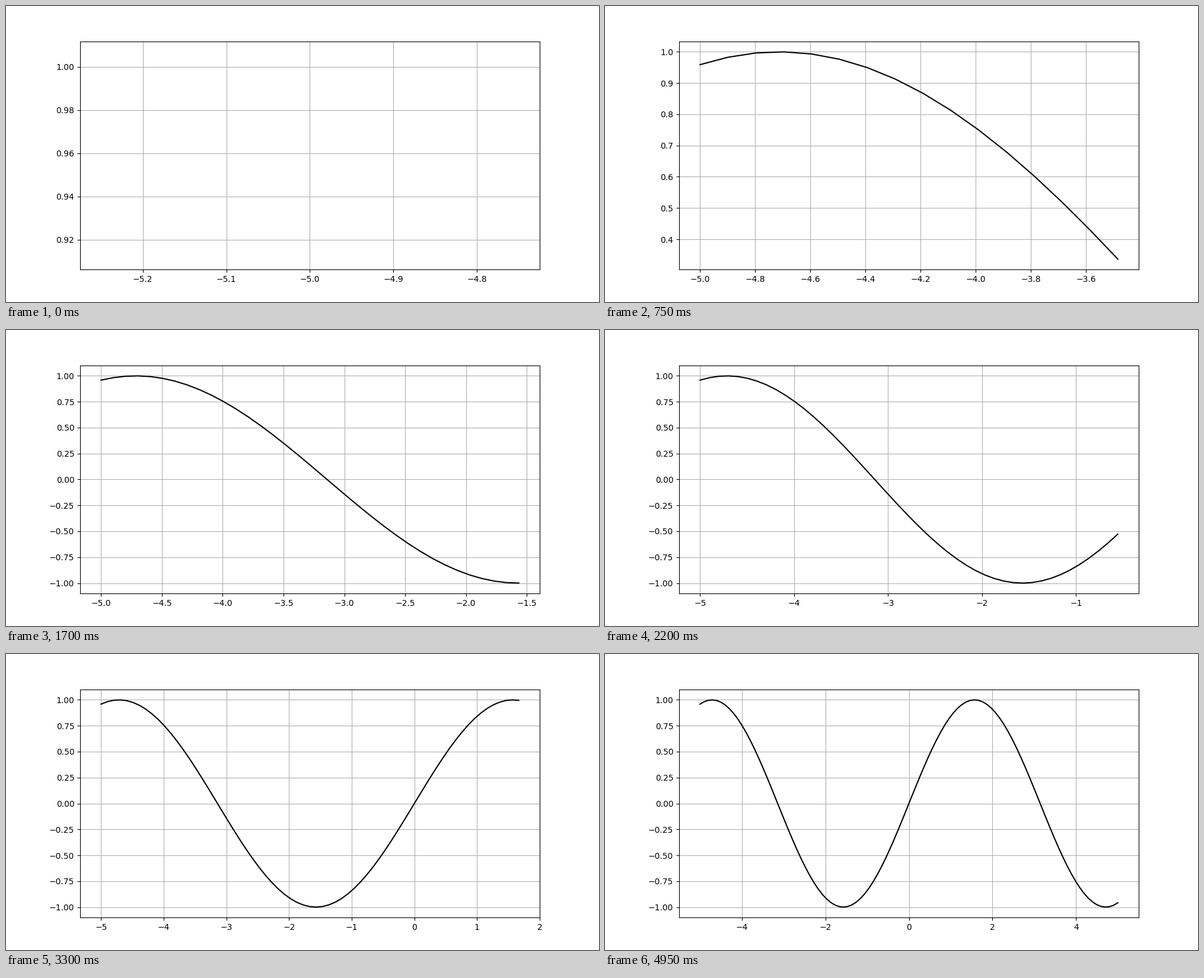
Write a matplotlib script that moves like this. It is 1000 px wide and 500 px high and loops after 5000 ms.

```python
import numpy as np
import matplotlib.pyplot as plt
from matplotlib.animation import FuncAnimation

FRAMES = 100
LOOP_MS = 5000

x = np.linspace(-5, 5, FRAMES)
y = np.sin(x)

fig, ax = plt.subplots(figsize=(10, 5), dpi=100)


def draw(frame):
    """Plot the sine up to the current point; the axes rescale to fit it."""
    ax.clear()
    ax.plot(x[:frame + 1], y[:frame + 1], color="black")
    ax.grid(True)


anim = FuncAnimation(fig, draw, frames=FRAMES, init_func=lambda: None,
                     interval=LOOP_MS / FRAMES, repeat=True, repeat_delay=0)
plt.show()
```
